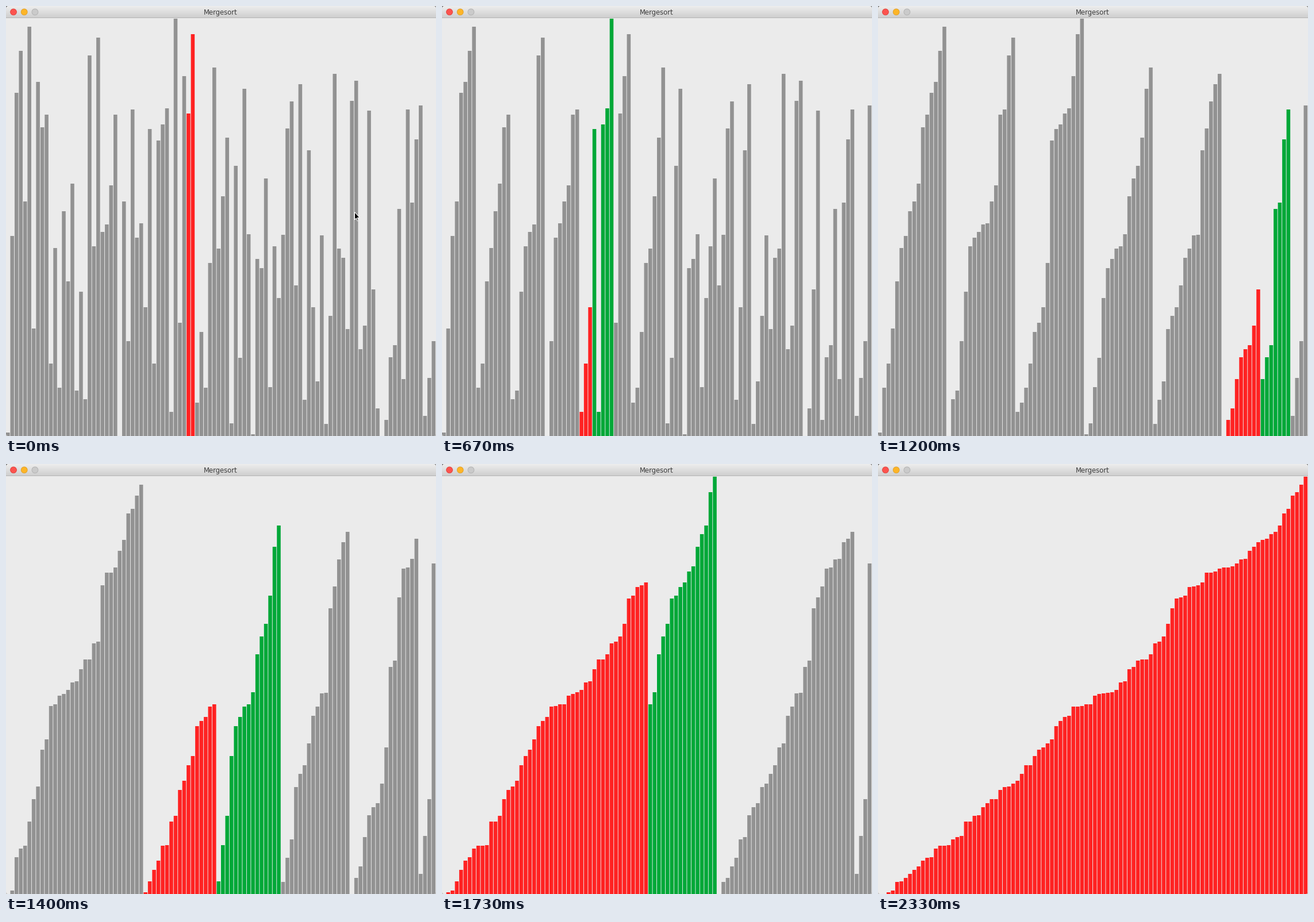
Write a matplotlib script that moves like this. It is 748x748 px and loops after 2790 ms.

```python
import numpy as np
import matplotlib.pyplot as plt
from matplotlib.animation import FuncAnimation
from matplotlib.collections import PolyCollection
from matplotlib.patches import Circle, Polygon

SIZE = 748
SCALE = 0.935
PITCH, BAR = 8 * SCALE, 7 * SCALE
TICK, LOOP = 10, 2790
BACK, GRAY, RED, GREEN = "#ebebeb", "#929292", "#ff2222", "#00a838"

# y of each bar's top edge
TOPS = [
    742, 400, 151, 78, 340, 36, 561, 132, 211, 189,
    622, 421, 664, 357, 479, 309, 669, 497, 684, 86,
    418, 55, 393, 380, 312, 189, 748, 340, 583, 180,
    403, 378, 524, 214, 622, 234, 206, 178, 706, 22,
    551, 122, 187, 49, 690, 567, 664, 447, 107, 422,
    331, 229, 726, 278, 612, 144, 397, 745, 440, 456,
    300, 663, 418, 508, 398, 213, 166, 486, 136, 685,
    251, 524, 653, 399, 727, 539, 118, 422, 438, 562,
    165, 130, 597, 556, 182, 493, 700, 748, 720, 611,
    590, 353, 649, 180, 342, 232, 173, 713, 647, 583,
]


def merge_steps(tops):
    """Bottom-up mergesort; one record per value written back."""
    a, n, steps = list(tops), len(tops), []
    width = 1
    while width < n:
        for lo in range(0, n - width, 2 * width):
            hi = min(lo + 2 * width, n)
            merged = sorted(a[lo:hi], reverse=True)
            for k in range(lo, hi):
                a[k] = merged[k - lo]
                steps.append((a.copy(), lo, k, hi))
        width *= 2
    return steps


def bar_colors(lo, k, hi):
    return [RED if lo <= i <= k else GREEN if k < i < hi else GRAY
            for i in range(len(TOPS))]


def bar_shapes(tops):
    x = np.arange(len(tops)) * PITCH
    y, base = np.array(tops, float), np.full(len(tops), float(SIZE))
    return np.stack([np.column_stack([x, base]), np.column_stack([x, y]),
                     np.column_stack([x + BAR, y]),
                     np.column_stack([x + BAR, base])], axis=1)


STEPS = merge_steps(TOPS)
# screen refreshes at 15 Hz, rounded to whole ticks
SHOTS = np.round(np.arange(36) * 20 / 3).astype(int)
PACE = np.interp(np.arange(36), [0, 6, 14, 21, 26, 29, 32, 34, 35],
                 [43, 158, 309, 440, 535, 590, 642, 677, len(STEPS) - 1])
PACE = np.round(PACE).astype(int)

fig = plt.figure(figsize=(SIZE / 100, SIZE / 100), dpi=100, facecolor=BACK)
ax = fig.add_axes([0, 0, 1, 1])
ax.axis("off")

bars = PolyCollection(bar_shapes(TOPS), linewidths=0, snap=False, zorder=1)
ax.add_collection(bars)

# title bar
shade = np.linspace(0.925, 0.81, 20)[:, None]
ax.imshow(shade, cmap="gray", vmin=0, vmax=1, extent=(0, SIZE, 20, 0),
          aspect="auto", interpolation="nearest", zorder=2)
ax.fill_between([0, SIZE], 20, 21, color="#b4b4b4", lw=0, zorder=2)
ax.text(373.3, 14.8, "Mergesort", ha="center", va="baseline",
        family="DejaVu Sans", fontsize=11.6 * 0.72, color="#3c3c3c", zorder=3)
for cx, face, edge in [(13, "#fc534e", "#e0443f"), (31.7, "#fdb527", "#e0a02a"),
                       (50.4, "#cacaca", "#b2b2b2")]:
    ax.add_patch(Circle((cx, 10.4), 5.4, fc=face, ec=edge, lw=0.65, zorder=3))

# rounded window corners
arc = np.linspace(0, np.pi / 2, 8)
for cx, cy, tone in [(0, 0, "#6a6a6a"), (SIZE, 0, "#8a8a8a"),
                     (0, SIZE, "#c4c4c4"), (SIZE, SIZE, "#c4c4c4")]:
    sx, sy = (1 if cx == 0 else -1), (1 if cy == 0 else -1)
    curve = np.column_stack([cx + sx * 4 * (1 - np.cos(arc)),
                             cy + sy * 4 * (1 - np.sin(arc))])
    ax.add_patch(Polygon(np.vstack([[cx, cy], curve]), fc=tone, lw=0, zorder=4))

pointer = Polygon(
    [(606.5, 358.5), (606.5, 371.8), (609.4, 369), (611.3, 373.8),
     (613.2, 373), (611.2, 368.3), (615.2, 368)],
    fc="black", ec="white", lw=0.75, joinstyle="miter", zorder=5)
ax.add_patch(pointer)

ax.set_xlim(0, SIZE)
ax.set_ylim(SIZE, 0)


def update(tick):
    shot = np.searchsorted(SHOTS, tick, side="right") - 1
    tops, lo, k, hi = STEPS[PACE[shot]]
    bars.set_verts(bar_shapes(tops))
    bars.set_facecolor(bar_colors(lo, k, hi))
    pointer.set_visible(shot == 0)
    return bars, pointer


anim = FuncAnimation(fig, update, frames=LOOP // TICK, interval=TICK,
                     repeat=True, repeat_delay=0, blit=False)
plt.show()
```
